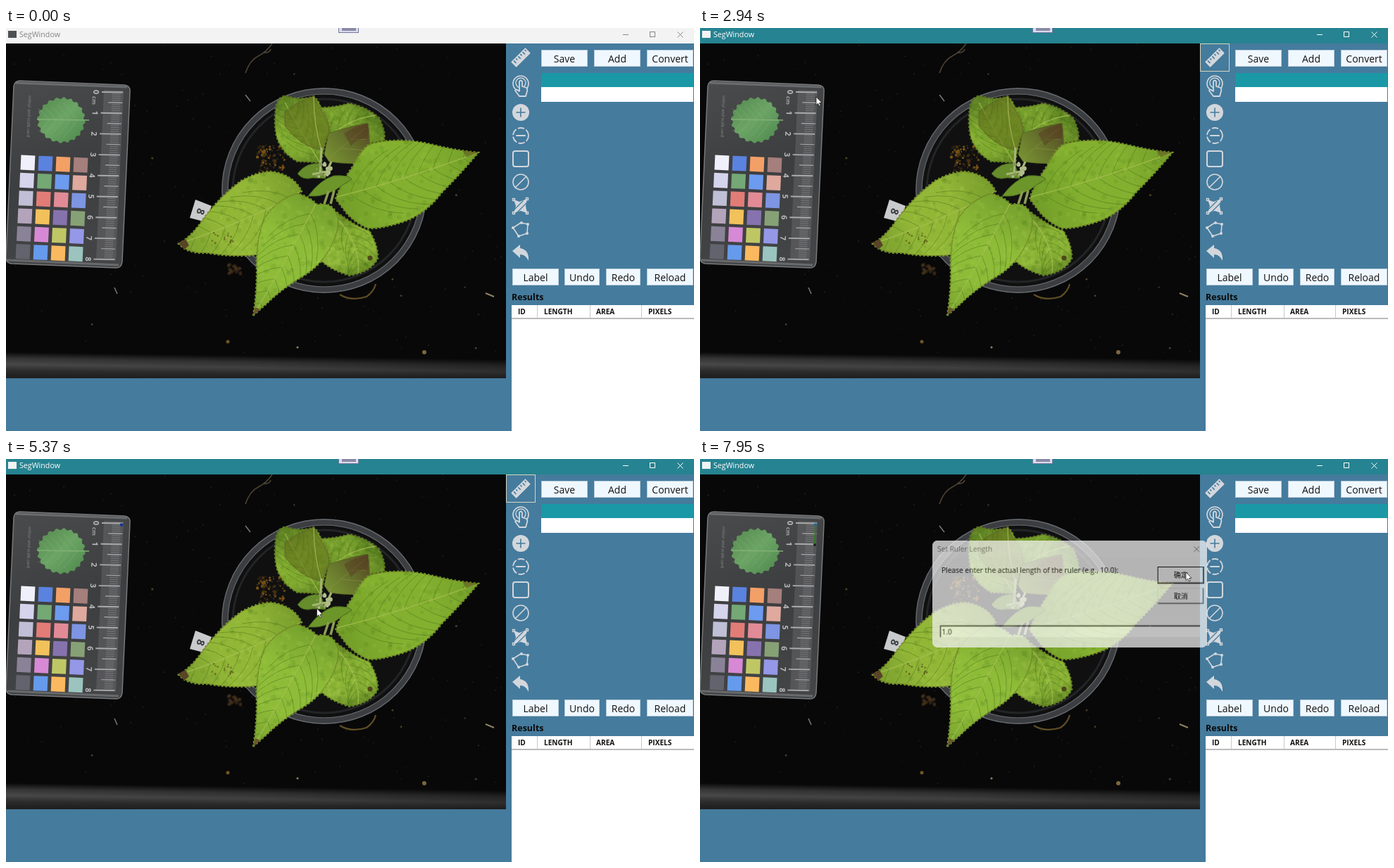
Recreate the animation shown at these times as an HTML page with a canvas. Size 977 px wide and 573 px high, loop 8 s.

```html
<!DOCTYPE html>
<html lang="en">
<head>
<meta charset="utf-8">
<title>SegWindow</title>
<style>
html, body { margin: 0; width: 100%; height: 100%; overflow: hidden; background: #457b9d; }
canvas { display: block; width: 977px; height: 573px; }
</style>
</head>
<body>
<canvas id="stage" width="977" height="573"></canvas>
<script>
const LOOP = 8000, W = 977, H = 573;
const UI = '"Open Sans", "Noto Sans", sans-serif';
const CJK = '"Noto Sans CJK SC", "Noto Sans CJK", "Noto Sans CJK JP", sans-serif';
const TEAL = '#268391', ICON = '#d3d7dc';
const stage = document.getElementById('stage').getContext('2d');

function layer(w, h) {
  const c = document.createElement('canvas');
  c.width = w; c.height = h;
  return c.getContext('2d');
}
function rect(g, x, y, w, h, fill) { g.fillStyle = fill; g.fillRect(x, y, w, h); }
function frame(g, x, y, w, h, color, width = 1) {
  g.strokeStyle = color; g.lineWidth = width; g.strokeRect(x, y, w, h);
}
function text(g, s, x, y, font, color, align = 'left') {
  g.font = font; g.fillStyle = color; g.textAlign = align; g.textBaseline = 'alphabetic';
  g.fillText(s, x, y);
}
function line(g, points, color, width = 1) {
  g.beginPath();
  for (let i = 0; i < points.length; i += 2) g.lineTo(points[i], points[i + 1]);
  g.strokeStyle = color; g.lineWidth = width; g.stroke();
}
function disc(g, x, y, r, fill) {
  g.beginPath(); g.arc(x, y, r, 0, 7); g.fillStyle = fill; g.fill();
}
function ring(g, x, y, r, color, width) {
  g.beginPath(); g.arc(x, y, r, 0, 7);
  g.strokeStyle = color; g.lineWidth = width; g.stroke();
}
function path(g, d, fill, stroke, width = 1) {
  const p = new Path2D(d);
  if (fill) { g.fillStyle = fill; g.fill(p); }
  if (stroke) { g.strokeStyle = stroke; g.lineWidth = width; g.stroke(p); }
}
function gradient(g, x0, y0, x1, y1, ...colors) {
  const grad = g.createLinearGradient(x0, y0, x1, y1);
  colors.forEach((c, i) => grad.addColorStop(i / (colors.length - 1), c));
  return grad;
}
let seed = 11;
function random() {
  seed = (seed * 16807) % 2147483647;
  return seed / 2147483647;
}

// ---- photograph ----

// rib: base, bend and tip of the middle vein
function leaf(g, d, rib, light, dark, spread = 60, veins = 9) {
  const p = new Path2D(d), [x0, y0, cx, cy, x1, y1] = rib;
  g.save();
  g.strokeStyle = dark; g.lineWidth = 2.4; g.setLineDash([2.5, 3]);
  g.stroke(p);
  g.setLineDash([]);
  g.fillStyle = gradient(g, x0, y0, x1, y1, dark, light, light, dark);
  g.fill(p);
  g.clip(p);
  for (let i = 0; i < 420; i++) {
    const t = random();
    const x = x0 + (x1 - x0) * t + (random() - .5) * spread * 2.4;
    const y = y0 + (y1 - y0) * t + (random() - .5) * spread * 2.4;
    disc(g, x, y, 1 + random() * 3, random() < .5 ? 'rgba(35,75,5,.09)' : 'rgba(205,230,100,.08)');
  }
  const vein = 'rgba(62,104,20,.5)';
  for (let i = 1; i < veins; i++) {
    const t = i / veins, u = 1 - t;
    const x = u * u * x0 + 2 * u * t * cx + t * t * x1;
    const y = u * u * y0 + 2 * u * t * cy + t * t * y1;
    const dir = Math.atan2(u * (cy - y0) + t * (y1 - cy), u * (cx - x0) + t * (x1 - cx));
    for (const side of [-1, 1]) {
      const a = dir + side * .95, b = dir + side * .6;
      g.beginPath();
      g.moveTo(x, y);
      g.quadraticCurveTo(x + Math.cos(a) * spread * .5, y + Math.sin(a) * spread * .5,
        x + Math.cos(b) * spread, y + Math.sin(b) * spread);
      g.strokeStyle = vein; g.lineWidth = .9; g.stroke();
    }
  }
  path(g, `M${x0} ${y0}Q${cx} ${cy} ${x1} ${y1}`, null, 'rgba(165,190,80,.75)', 1.5);
  g.strokeStyle = 'rgba(96,92,28,.6)'; g.lineWidth = 1.6; g.stroke(p);
  g.restore();
}

function drawCard(g) {
  const body = 'M20 75L168 81Q177 82 176 91L165 332Q164 342 155 341L8 335Q0 334 0 326L11 83Q12 75 20 75Z';
  path(g, body, gradient(g, 20, 75, 120, 340, '#4a4b4c', '#3d3e40', '#444547'), '#77797b', 1.5);
  path(g, 'M14 78L172 84M2 330L160 337', null, 'rgba(150,152,154,.45)', 3);
  path(g, 'M139 88L167 89L156 331L128 330Z', 'rgba(120,122,123,.35)');
  for (let i = 0; i <= 80; i++) {
    const y = 91 + i * 2.97, x = 166 - i * .145;
    line(g, [x - 15, y, x - 3, y], 'rgba(165,167,168,.35)', 1.3);
    if (i % 5 === 0) line(g, [x - (i % 10 ? 20 : 30), y, x, y + .5], '#a9abac', i % 10 ? 1.2 : 1.9);
  }
  for (let i = 0; i <= 8; i++) {
    g.save();
    g.translate(128 - i * 1.4, 91 + i * 29.7);
    g.rotate(Math.PI / 2 + .04);
    text(g, String(i), 0, 4, 'bold 11px ' + UI, '#b9bbbb', 'center');
    if (!i) text(g, 'cm', 6, 5, 'bold 8px ' + UI, '#a5a7a7');
    g.restore();
  }
  g.save();
  g.translate(34, 96); g.rotate(Math.PI / 2 + .04);
  text(g, 'colour and scale card', 0, 2, '6px ' + UI, '#8a8c8d');
  g.restore();

  g.beginPath();
  for (let i = 0; i <= 120; i++) {
    const a = i / 120 * Math.PI * 2, r = 31.5 + 1.4 * Math.sin(a * 20);
    g.lineTo(80 + r * Math.cos(a) * (Math.cos(a) < 0 ? 1.1 : 1), 131 + r * Math.sin(a));
  }
  g.fillStyle = gradient(g, 50, 100, 105, 160, '#578b50', '#6ba465', '#528c50'); g.fill();
  line(g, [44, 130, 118, 131], '#82b077', 1.3);
  for (let i = 0; i < 5; i++)
    for (const s of [-1, 1])
      line(g, [101 - i * 10, 131, 93 - i * 10, 131 + s * 11, 82 - i * 9, 131 + s * (24 - i * 2)], 'rgba(133,180,122,.5)', .9);

  const swatches = [
    '#f0f0fb #5a82df #f3a067 #a47f7c', '#d4d4ec #74a875 #6c9bef #dfa99e',
    '#bfbfd5 #e27c77 #e28b96 #7d95e2', '#b4a4bb #f2c15c #8673ae #87a176',
    '#8a8397 #d789d5 #bfc765 #9498e7', '#63636d #669aec #fbb95f #9bc4bf'];
  swatches.forEach((row, r) => row.split(' ').forEach((color, c) => {
    g.save();
    g.translate(31 + c * 25 - r * 1.38, 191 + c * 1.1 + r * 25.3);
    g.rotate(.045);
    rect(g, -10, -10, 20, 21, color);
    g.restore();
  }));
}

function drawPhoto(g) {
  g.save();
  g.beginPath(); g.rect(0, 22, 710, 476); g.clip();
  rect(g, 0, 22, 710, 476, '#080809');
  for (let i = 0; i < 260; i++)
    disc(g, random() * 710, 22 + random() * 440, .4 + random() * .7, 'rgba(120,115,100,.22)');
  for (let i = 0; i < 16; i++)
    disc(g, random() * 700, 40 + random() * 420, .7 + random() * 1.1, 'rgba(125,105,60,.55)');

  g.save();
  g.translate(0, 461); g.rotate(.015);
  rect(g, 0, 0, 720, 50, gradient(g, 0, 0, 0, 34, '#0a0a0b', '#343435', '#484848', '#2d2d2e', '#202021'));
  rect(g, 0, -1, 720, 50, gradient(g, 0, 0, 710, 0, 'rgba(8,8,9,0)', 'rgba(8,8,9,.12)', 'rgba(8,8,9,.4)'));
  g.restore();

  path(g, 'M378 22Q370 34 358 40T340 64M365 35Q374 36 376 30', null, '#4c4332', 1.6);
  path(g, 'M340 95L347 104M154 369L158 378', null, '#77746b', 1.6);
  path(g, 'M681 377L693 382', null, '#8d8260', 2);
  path(g, 'M474 379Q490 389 512 382Q523 374 525 364', null, '#5f4d24', 2.2);
  for (let i = 0; i < 22; i++)
    disc(g, 323 + (random() - .5) * 20, 342 + (random() - .5) * 16, 2.4, 'rgba(80,57,32,.45)');
  disc(g, 315, 446, 2.5, '#6d5526'); disc(g, 594, 461, 3, '#7c673c'); disc(g, 414, 454, 1.6, '#8b8055');

  drawCard(g);

  disc(g, 452, 231, 141, '#101011');
  ring(g, 452, 231, 141, '#3b3d40', 9);
  ring(g, 452, 231, 145.2, '#65686c', 1.4);
  ring(g, 452, 231, 137, '#606367', 1.2);
  ring(g, 452, 231, 130, '#232426', 3);
  for (let i = 0; i < 90; i++)
    disc(g, 378 + (random() - .5) * 42, 186 + (random() - .5) * 40, .8 + random() * 1.5,
      ['#755015', '#463010', '#28200f'][i % 3]);

  path(g, 'M269 244L292 253L284 276L261 270Z', '#c9cacb');
  g.save(); g.translate(276, 261); g.rotate(1.9);
  text(g, '8', 0, 5, 'bold 15px ' + UI, '#3b3c40', 'center');
  g.restore();

  leaf(g, 'M446 113Q468 113 487 107Q512 112 530 128Q540 148 537 160L500 166L462 158L440 140Z',
    [450, 165, 480, 130, 525, 124], '#779f2d', '#567b1f', 30, 6);
  leaf(g, 'M470 262Q500 284 516 288Q529 310 528 328Q518 347 488 352Q463 345 447 331L456 290Z',
    [470, 270, 505, 310, 500, 350], '#8ab335', '#648a24', 38, 7);
  disc(g, 517, 327, 3.5, '#4d481b');
  leaf(g, 'M383 116Q384 99 397 96Q418 104 437 97Q446 105 447 115Q461 132 459 149Q451 166 448 192Q430 190 414 190Q391 178 384 154Q380 134 383 116Z',
    [446, 192, 420, 150, 396, 106], '#82ac30', '#5c8022', 45, 7);
  path(g, 'M396 119Q411 106 437 97L447 117Q459 133 459 149L448 174Q416 167 396 139Z', 'rgba(92,105,25,.55)', '#65672a', 1);
  path(g, 'M437 98Q437 137 448 174', null, '#9caa4d', 1.4);
  path(g, 'M458 150Q483 141 514 135Q518 158 515 190Q494 195 459 190L452 180Z',
    gradient(g, 455, 190, 514, 140, '#7a9433', '#65732c', '#574524'), '#596a24', 1);
  path(g, 'M457 187Q480 166 511 142M476 171L510 174M490 159L512 158', null, 'rgba(148,150,72,.5)');
  path(g, 'M480 150Q498 138 514 139L513 158Q499 156 490 168Z', 'rgba(87,62,35,.5)');

  leaf(g, 'M468 243Q474 223 492 197Q506 169 519 164Q560 155 603 165Q638 174 671 177Q646 207 619 234Q596 265 563 276Q532 286 514 285Q497 278 484 264Z',
    [470, 240, 560, 218, 671, 177], '#83b02f', '#719d28', 82, 10);
  path(g, 'M648 174L671 177L654 184Z', 'rgba(99,84,35,.55)');
  leaf(g, 'M245 307Q265 295 281 270Q305 238 334 217Q357 204 378 204Q409 209 420 232Q400 248 386 262L363 322Q326 327 286 320Q264 321 252 313Z',
    [418, 233, 352, 271, 245, 307], '#92b737', '#789c2c', 68, 9);
  path(g, 'M245 305L255 300L260 309L253 315Z', '#594426');
  for (let i = 0; i < 16; i++)
    disc(g, 308 + (random() - .5) * 34, 299 + (random() - .5) * 18, .8 + random(), 'rgba(91,83,27,.65)');

  path(g, 'M429 239Q447 215 466 210Q488 209 491 215Q476 224 467 231Q448 239 440 239Z', '#6c962a', '#4a6b1d', 1);
  path(g, 'M414 207Q427 190 447 193L454 214L436 213Q421 217 414 207Z', '#668c2c', '#45631a', 1);
  path(g, 'M448 170L446 207M452 211L462 190M435 208L455 204', null, '#a5b673', 3);
  for (let i = 0; i < 15; i++)
    disc(g, 451 + (random() - .5) * 20, 201 + (random() - .5) * 21, 1.5 + random() * 2, i % 2 ? '#b2bd8a' : '#839657');
  path(g, 'M452 250L458 232M461 250L466 231', null, '#8d9c58', 3.5);

  leaf(g, 'M351 409Q356 377 356 345Q354 302 367 270Q384 244 413 235Q430 239 442 251Q463 246 471 267Q475 283 464 306Q451 334 425 351Q391 371 369 393Z',
    [440, 250, 405, 318, 351, 409], '#8ebc38', '#77a22e', 68, 10);
  path(g, 'M351 409L354 397L361 400Z', '#6a5630');
  g.restore();
}

// ---- user interface ----

function button(g, label, x, y, w) {
  rect(g, x, y, w, 24, '#f0f8ff');
  frame(g, x + .5, y + .5, w - 1, 23, '#b9cbda');
  text(g, label, x + w / 2, y + 17.5, '14px ' + UI, '#111', 'center');
}

function drawIcons(g) {
  g.save();
  g.lineCap = g.lineJoin = 'round';
  g.save();
  g.translate(731, 42); g.rotate(-.78);
  rect(g, -14, -5, 28, 10, ICON);
  for (let i = 0; i < 6; i++) rect(g, -11 + i * 4.4, -5, 1.6, i % 2 ? 4 : 6, '#457b9d');
  frame(g, -13.5, -4.5, 27, 9, ICON, 1.4);
  g.restore();

  ring(g, 731, 79, 11, ICON, 1.6);
  ring(g, 731, 78, 7, ICON, 1.4);
  path(g, 'M729 90V76Q731 73 733 76V83L739 85Q741 86 740 90L738 97H729L723 89Q724 86 729 90Z', '#457b9d', ICON, 1.8);

  disc(g, 731, 120, 12, ICON);
  path(g, 'M725 120H737M731 114V126', null, '#457b9d', 1.6);
  g.setLineDash([8, 4]);
  ring(g, 731, 153, 11, ICON, 1.8);
  g.setLineDash([]);
  path(g, 'M725 153H737', null, ICON, 2);
  path(g, 'M723 175H739Q742 175 742 178V194Q742 197 739 197H723Q720 197 720 194V178Q720 175 723 175Z', null, ICON, 2);
  ring(g, 731, 219, 11, ICON, 1.6);
  path(g, 'M723 227L739 211', null, ICON, 1.6);
  path(g, 'M721 244L729 247L740 243L738 253L740 263L731 260L721 263L724 253Z', ICON);
  path(g, 'M722 258L734 246M726 262L739 249', null, '#457b9d', 1.3);
  for (const [x, y] of [[721, 244], [740, 243], [740, 263], [721, 263]]) frame(g, x - 1.5, y - 1.5, 3, 3, ICON, 1.4);
  path(g, 'M720 284L731 277L741 279L740 292L728 296Z', null, ICON, 1.6);
  for (const [x, y] of [[720, 284], [732, 277], [741, 279], [740, 292], [728, 296]]) disc(g, x, y, 2, ICON);
  path(g, 'M719 317L730 308V313Q743 315 742 331Q738 322 730 322V327Z', ICON);
  g.restore();
}

function drawPanel(g) {
  button(g, 'Save', 760, 31, 66);
  button(g, 'Add', 835, 31, 66);
  button(g, 'Convert', 910, 31, 66);
  button(g, 'Label', 719, 342, 66);
  button(g, 'Undo', 793, 342, 50);
  button(g, 'Redo', 852, 342, 49);
  button(g, 'Reload', 910, 342, 66);
  rect(g, 760, 64, 216, 20, '#1b98a6');
  rect(g, 760, 84, 216, 21, '#fff');
  drawIcons(g);
  text(g, 'Results', 718, 387, 'bold 12.5px ' + UI, '#0a0a0a');
  rect(g, 718, 394, 259, 179, '#fff');
  rect(g, 718, 412, 259, 2, '#b9bbbd');
  for (const x of [754, 829, 902]) rect(g, x, 394, 1, 18, '#c6c8ca');
  [['ID', 727], ['LENGTH', 764], ['AREA', 838], ['PIXELS', 912]].forEach(([s, x]) =>
    text(g, s, x, 407, 'bold 10.1px ' + UI, '#111'));
}

function cross(g, x, y, color) {
  path(g, `M${x - 4} ${y - 4}l8 8m0 -8l-8 8`, null, color, 1);
}

function drawTitleBar(g, active) {
  const ink = active ? '#fff' : '#858585';
  rect(g, 0, 0, W, 22, active ? TEAL : '#f3f3f3');
  rect(g, 3, 4, 12, 10, active ? '#f3f3f3' : '#4e5254');
  text(g, 'SegWindow', 19, 13, '10.7px ' + UI, ink);
  line(g, [876, 9.5, 884, 9.5], ink);
  frame(g, 914.5, 5.5, 7, 7, ink);
  cross(g, 957.5, 9.5, ink);
  rect(g, 472, 0, 29, 7, '#77789f');
  rect(g, 473, 0, 27, 6, '#dcdcec');
  rect(g, 477, 0, 20, 4, '#8b8ba7');
}

// ---- dialogs ----

function dialogBase(w, h, bar, barColor, bodyColor) {
  const g = layer(w, h);
  g.beginPath(); g.roundRect(0, 0, w, h, 7); g.clip();
  rect(g, 0, 0, w, h, bodyColor);
  rect(g, 0, 0, w, bar, barColor);
  return g;
}
function dialogButton(g, label, x, y, w, h, size, edge) {
  rect(g, x, y, w, h, '#f0f0f0');
  frame(g, x + .5, y + .5, w - 1, h - 1, edge);
  path(g, `M${x + 1} ${y + h - 1.5}h${w - 2.5}v${2 - h}`, null, '#666', 1.5);
  text(g, label, x + w / 2, y + h / 2 + size * .38, size + 'px ' + CJK, '#111', 'center');
}
function messageDialog(w, message) {
  const g = dialogBase(w, 129, 26, TEAL, '#fff');
  rect(g, 0, 85, w, 44, '#f0f0f0');
  cross(g, w - 15, 13, '#fff');
  text(g, message, 9.5, 59.5, '9.6px ' + UI, '#111');
  dialogButton(g, '确定', w - 82, 94, 67, 24, 9, '#555');
  g.beginPath(); g.roundRect(.5, .5, w - 1, 128, 7);
  g.strokeStyle = TEAL; g.lineWidth = 1; g.stroke();
  return g.canvas;
}
function lengthDialog(active) {
  const g = dialogBase(400, 156, 25, active ? TEAL : '#f3f3f3', '#f0f0f0');
  const ink = active ? '#fff' : '#777';
  text(g, 'Set Ruler Length', 7, 16, '10.5px ' + UI, ink);
  cross(g, 385, 12.5, ink);
  text(g, 'Please enter the actual length of the ruler (e.g., 10.0):', 13, 47, '10.5px ' + UI, '#111');
  dialogButton(g, '确定', 328, 38, 68, 25, 10.3, '#111');
  dialogButton(g, '取消', 328, 69, 68, 24, 10.3, '#ddd');
  rect(g, 11, 124, 379, 17, '#fff');
  path(g, 'M11.5 141V124.5H390', null, '#555', 1.8);
  text(g, '1.0', 13.5, 137, '10.5px ' + UI, '#111');
  return g.canvas;
}

const FADE = 150;
const dialogs = [
  { open: 1320, close: 2030, x: 364, y: 150,
    face: messageDialog(323, 'Please select the start and end points of the ruler on the image.') },
  { open: 4250, close: 5080, x: 392, y: 154,
    face: messageDialog(280, 'Start point set. Please select the end point of the ruler.') },
  { open: 6803, close: 7912, x: 325, y: 114, face: lengthDialog(true), leaving: lengthDialog(false) }
];

function drawDialog(d, t) {
  const closing = t >= d.close;
  const alpha = closing ? 1 - (t - d.close) / FADE : Math.min(1, (t - d.open) / FADE);
  if (t < d.open || alpha <= 0) return;
  const scale = closing ? .9 + .1 * alpha : .82 + .18 * alpha;
  const face = closing && d.leaving || d.face;
  const w = face.width * scale, h = face.height * scale;
  stage.globalAlpha = alpha;
  stage.drawImage(face, d.x + (face.width - w) / 2, d.y + (face.height - h) / 2, w, h);
  stage.globalAlpha = 1;
}

// ---- pointer: time, x, y ----

const pointerPath = [
  [190, 905, 518], [330, 838, 452], [480, 751, 300], [620, 702, 150], [730, 708, 84], [820, 727, 62],
  [1090, 727, 62], [1200, 727, 48], [1440, 727, 48], [1580, 706, 105], [1740, 655, 222], [1890, 636, 254],
  [2060, 636, 254], [2220, 545, 222], [2430, 310, 150], [2600, 190, 113], [2730, 165, 105],
  [2800, 165, 100], [2940, 165, 98], [3200, 164, 95], [3400, 164, 95], [3530, 163, 94],
  [4400, 163, 94], [4480, 166, 112], [4550, 182, 142], [4700, 390, 205], [4850, 575, 247], [4960, 621, 258],
  [5110, 621, 258], [5270, 540, 238], [5480, 335, 185], [5660, 230, 162], [5780, 204, 155],
  [5850, 189, 140], [6000, 173, 128], [6210, 165, 123], [6470, 165, 123], [6700, 163, 122],
  [7000, 163, 122], [7150, 225, 126], [7350, 440, 142], [7550, 620, 156], [7720, 680, 161], [7820, 690, 161], [8000, 690, 161]
];

function drawPointer(t) {
  const i = pointerPath.findIndex(p => p[0] > t);
  if (i < 1) return;
  const [t0, x0, y0] = pointerPath[i - 1], [t1, x1, y1] = pointerPath[i];
  const k = (t - t0) / (t1 - t0);
  stage.save();
  stage.translate(x0 + (x1 - x0) * k, y0 + (y1 - y0) * k);
  path(stage, 'M0 0V11.5L2.6 9.2L4.4 13L6.2 12.2L4.5 8.6L8 8.3Z', '#fff', '#111', .7);
  stage.restore();
}

const backdrop = layer(W, H);
rect(backdrop, 0, 0, W, H, '#457b9d');
drawPhoto(backdrop);
drawPanel(backdrop);

function render(t) {
  stage.drawImage(backdrop.canvas, 0, 0);
  const modal = dialogs.some(d => t >= d.open && t < d.close);
  const active = t >= 1270 && !modal;
  drawTitleBar(stage, active);
  if (active && t < 6800) frame(stage, 710.5, 22.5, 41, 39, '#d9d5bd');
  else if (t >= 1130 && t < 1520) frame(stage, 710.5, 22.5, 40, 39, '#3a8799');
  if (t >= 6750) {
    line(stage, [164, 94, 163, 122], '#2f7d20', 2);
    disc(stage, 163, 122, 2, '#102410');
  }
  if (t >= 4200) disc(stage, 164, 93.5, 2.2, t < 6750 ? '#15338f' : '#246a94');
  dialogs.forEach(d => drawDialog(d, t));
  drawPointer(t);
}

function tick() {
  render(performance.now() % LOOP);
  requestAnimationFrame(tick);
}
tick();
</script>
</body>
</html>
```
